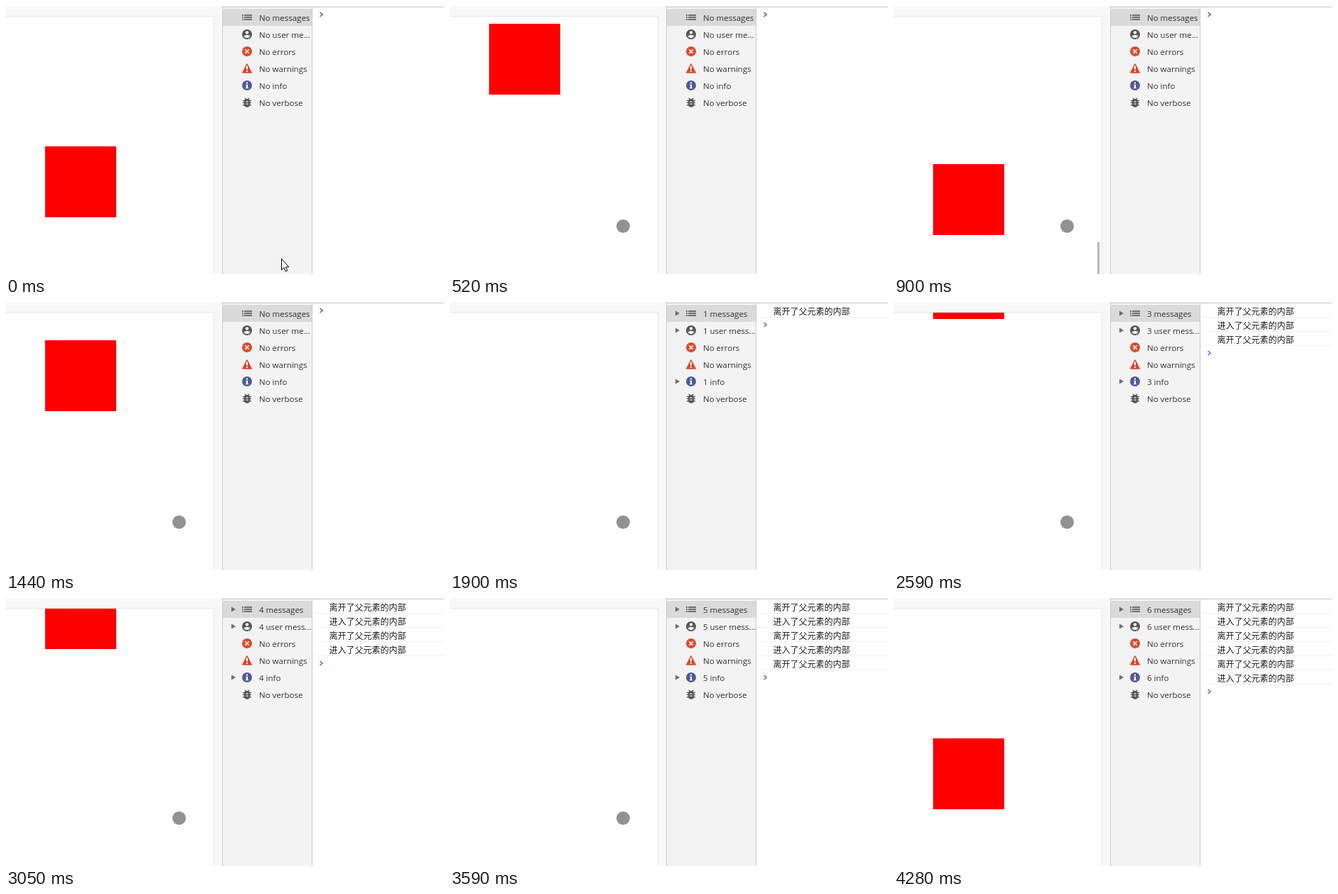
An HTML page that plays this animation: 616x378 px, repeating every 4.36 s.

```html
<!DOCTYPE html>
<html lang="zh">
<head>
<meta charset="utf-8">
<title>Scroll observer</title>
<style>
html, body { margin: 0; width: 100%; height: 100%; overflow: hidden; background: #f8f8f8; }
svg { display: block; width: 616px; height: 378px; }
.label { font: 11.5px "Open Sans", "Noto Sans", sans-serif; fill: #303030; }
.log text { font: 12px "Noto Sans CJK SC", "Noto Sans CJK", sans-serif; fill: #1c1c1c; }
.crisp { shape-rendering: crispEdges; }
</style>
</head>
<body>
<svg viewBox="0 0 616 378">
  <defs>
    <clipPath id="view"><rect y="15" width="292" height="363"/></clipPath>
  </defs>

  <!-- page preview -->
  <g class="crisp">
    <rect width="304" height="378" fill="#f8f8f8"/>
    <rect y="14" width="293" height="364" fill="#e4e4e4"/>
    <rect y="15" width="292" height="363" fill="#fff"/>
    <g clip-path="url(#view)">
      <rect id="box" x="55" y="198" width="100" height="100" fill="#f00"/>
      <rect id="thumb" x="286" y="341" width="3" height="400" fill="#b8b8b8" opacity="0"/>
    </g>
  </g>

  <!-- console panel -->
  <g class="crisp">
    <rect x="304" width="312" height="378" fill="#fff"/>
    <rect x="305" width="125" height="378" fill="#f3f3f3"/>
    <rect x="305" width="311" height="1" fill="#f3f3f3"/>
    <rect x="305" y="1" width="311" height="1" fill="#ccc"/>
    <rect x="305" y="4" width="125" height="24" fill="#dadada"/>
    <rect x="304" width="1" height="378" fill="#ccc"/>
    <rect x="430" y="2" width="1" height="376" fill="#ccc"/>
  </g>

  <g fill="#6e6e6e" transform="translate(339 16)">
    <path d="M-7-4h2v2h-2zM-7-1h2v2h-2zM-7 2h2v2h-2zM-4-4H7v2H-4zM-4-1H7v2H-4zM-4 2H7v2H-4z" class="crisp"/>
  </g>
  <g transform="translate(339 40)">
    <circle r="7" fill="#55565a"/>
    <circle cy="-2.6" r="2.2" fill="#f3f3f3"/>
    <path d="M-4.3 2.7C-3.8 0 3.8 0 4.3 2.7C2.4 5.8-2.4 5.8-4.3 2.7Z" fill="#f3f3f3"/>
  </g>
  <g transform="translate(339 64)">
    <circle r="7" fill="#e0492b"/>
    <path d="M-2.7-2.7L2.7 2.7M2.7-2.7L-2.7 2.7" stroke="#fff" stroke-width="1.6"/>
  </g>
  <g transform="translate(339 88)">
    <path d="M0-6L6.2 6H-6.2Z" fill="#e0492b" stroke="#e0492b" stroke-width="1.6" stroke-linejoin="round"/>
    <path d="M-1-3.5H1V1.5H-1ZM-1 3H1V5H-1Z" fill="#fff"/>
  </g>
  <g transform="translate(339 112)">
    <circle r="7" fill="#4e5b93"/>
    <path d="M-1-4.5H1V-2.5H-1ZM-2-1.3H1V3H2V4.3H-2V3H-1V0H-2Z" fill="#fff"/>
  </g>
  <g transform="translate(339 136)">
    <path d="M-3-6L-1.4-4.4M3-6L1.4-4.4M-6-2.6H6M-6 .6H6M-6 3.8H6" stroke="#55565a" stroke-width="1.5"/>
    <rect x="-4" y="-4.9" width="8" height="11.6" rx="4" fill="#55565a"/>
    <path d="M-1.6-.8H1.6M-1.6 2.2H1.6" stroke="#f3f3f3" stroke-width="1.3"/>
  </g>

  <g id="side"></g>
  <g id="log" class="log"></g>
  <path id="prompt" d="M441.5 9L445 12L441.5 15" fill="none" stroke-width="1.6"/>

  <circle id="dot" r="9.5" fill="#929292"/>
  <path id="arrow" d="M.5.5V16.4L4.1 13L6.4 18.4L8.7 17.4L6.4 12.1H10.8Z" fill="#fff" stroke="#000"/>
</svg>

<script>
const LOOP = 4360, START = 360, STEP = 76.85;
const $ = id => document.getElementById(id);
const NS = "http://www.w3.org/2000/svg";

function add(parent, tag, attrs, text) {
  const el = document.createElementNS(NS, tag);
  for (const k in attrs) el.setAttribute(k, attrs[k]);
  if (text) el.textContent = text;
  return parent.appendChild(el);
}

// Top edge of the box while the page is wheeled: [tick, y]
const scroll = [
  [-1, 198], [0, 185], [1, 110], [2, 25], [3, -2], [4, 2], [5, 30], [6, 82], [7, 223],
  [8, 285], [9, 296], [10, 298], [11, 298], [12, 285], [14, 54], [15, -50], [16, -102],
  [19, -102], [20, -85], [21, -5], [22, 95], [23, 170], [24, 197], [25, 198], [26, 180],
  [27, 105], [29, -76], [30, -95], [31, -99], [32, -95], [33, -82], [34, -60], [35, -28],
  [36, 50], [37, 98], [39, 98], [40, 70], [41, -10], [42, -85], [43, -65], [44, 20],
  [45, 140], [46, 198]
];

// Ticks at which the observer reports
const reports = [15, 22, 29, 35, 42, 44];

// Pointer poses: [ms, shape, x, y]
const pointer = [
  [0, "arrow", 387, 356], [70, "arrow", 352, 339], [140, "dot", 274, 319],
  [210, "dot", 243.5, 310.5], [3890, "arrow", 446, 325], [3970, "arrow", 538, 338],
  [4045, "arrow", 532, 362], [4120, "none", 0, 0]
];

const rows = [
  n => n ? n + " messages" : "No messages",
  n => n ? n + " user mess..." : "No user me...",
  () => "No errors",
  () => "No warnings",
  n => (n || "No") + " info",
  () => "No verbose"
];

const labels = rows.map((_, i) => add($("side"), "text", { class: "label", x: 356, y: 20.6 + 24 * i }));
const carets = [0, 1, 4].map(i =>
  add($("side"), "path", { d: "M317 12.5L323 16L317 19.5Z", fill: "#6e6e6e", transform: `translate(0 ${24 * i})` }));

const lines = reports.map((_, i) => {
  const g = add($("log"), "g", {});
  add(g, "text", { x: 454.5, y: 17.5 + 20 * i }, (i % 2 ? "进入" : "离开") + "了父元素的内部");
  add(g, "rect", { x: 431, y: 21 + 20 * i, width: 185, height: 1, fill: "#f0f0f0", class: "crisp" });
  return g;
});

function lerpKeys(keys, k) {
  if (k <= keys[0][0]) return keys[0][1];
  for (let i = 1; i < keys.length; i++) {
    const [a, ya] = keys[i - 1], [b, yb] = keys[i];
    if (k <= b) return ya + (yb - ya) * (k - a) / (b - a);
  }
  return keys[keys.length - 1][1];
}

const show = (el, on) => el.setAttribute("visibility", on ? "visible" : "hidden");

function draw(t) {
  const k = Math.floor((t - START) / STEP);
  const y = Math.round(lerpKeys(scroll, k));
  $("box").setAttribute("y", y);
  $("thumb").setAttribute("y", Math.round(341.4 + (198 - y) * 0.345));
  $("thumb").setAttribute("opacity", k < 0 || k > 50 ? 0 : k < 48 ? 1 : k < 49 ? 0.66 : 0.33);

  const n = reports.filter(r => k >= r).length;
  labels.forEach((el, i) => { el.textContent = rows[i](n); });
  carets.forEach(el => show(el, n > 0));
  lines.forEach((el, i) => show(el, i < n));
  $("prompt").setAttribute("transform", `translate(0 ${20 * n})`);
  $("prompt").setAttribute("stroke", n ? "#367cf1" : "#56618f");

  const [, shape, px, py] = pointer.filter(p => t >= p[0]).pop();
  for (const id of ["dot", "arrow"]) {
    show($(id), id === shape);
    $(id).setAttribute("transform", `translate(${px} ${py})`);
  }
}

const begin = performance.now();
function tick() {
  draw((performance.now() - begin) % LOOP);
  requestAnimationFrame(tick);
}
draw(0);
requestAnimationFrame(tick);
</script>
</body>
</html>
```
